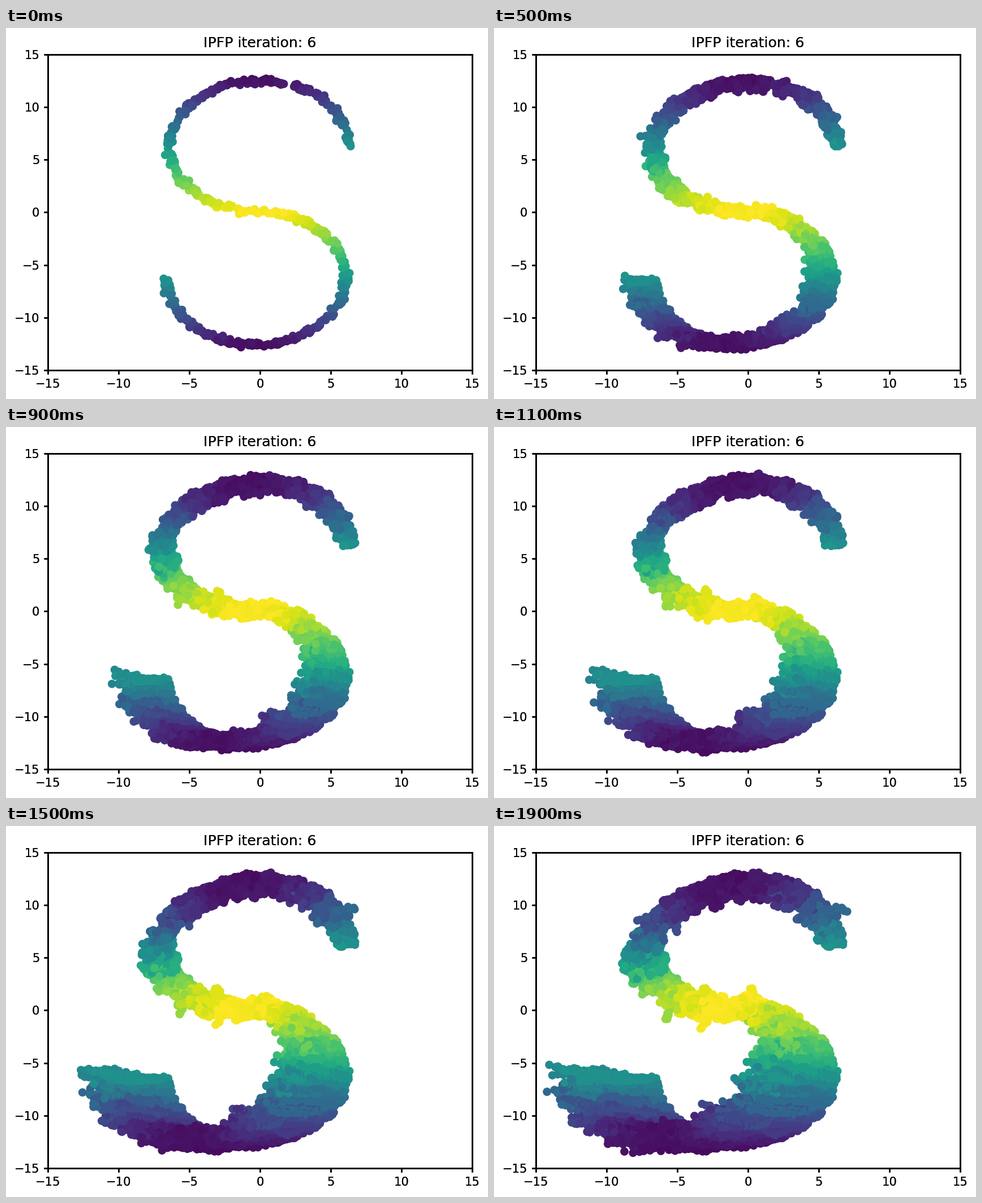
Animation of 852 by 657 pixels, one loop 2000 ms. Source, as a matplotlib script:

```python
import numpy as np
import matplotlib.pyplot as plt
from matplotlib.animation import FuncAnimation

W, H, DPI = 852, 657, 150
STEPS, STEP_MS = 20, 100
COUNT, SCALE, NOISE = 600, 6.3, 0.135
LEFT, RIGHT, TOP, BOTTOM = 74, 824, 47, 606

plt.rcParams.update({
    "axes.titlesize": 12.1, "xtick.labelsize": 10.1, "ytick.labelsize": 10.1,
    "axes.linewidth": 1.25, "xtick.major.width": 1.25, "ytick.major.width": 1.25,
})


def sigmoid(x):
    return 1 / (1 + np.exp(-x))


def s_curve(t):
    return SCALE * np.column_stack([np.sin(t), np.sign(t) * (np.cos(t) - 1)])


def total_drift(t):
    """The lower bowl slides left, the upper left arc sinks, the rest rises a little."""
    dx = -1.6 * sigmoid(2 * (t + 4.3)) - 5.2 * sigmoid(3 * (t - 1.1))
    dy = 0.5 - 2.7 * np.exp(-((t + 2.3) / 1.4) ** 2)
    return np.column_stack([dx, dy])


def make_walk():
    """Positions of every particle after each step, shape (STEPS, COUNT, 2)."""
    rng = np.random.default_rng(6)
    t = 3 * np.pi * (rng.random(COUNT) - 0.5)
    moves = total_drift(t) / STEPS + rng.normal(0, NOISE, (STEPS, COUNT, 2))
    return s_curve(t) + np.cumsum(moves, axis=0)


def add_panel(fig):
    ax = fig.add_axes([LEFT / W, 1 - BOTTOM / H, (RIGHT - LEFT) / W, (BOTTOM - TOP) / H])
    ax.set(xlim=(-15, 15), ylim=(-15, 15), title="IPFP iteration: 6")
    ax.set_xticks(range(-15, 16, 5))
    ax.set_yticks(range(-15, 16, 5))
    ax.patch.set_visible(False)
    return ax


walk = make_walk()
shade = -abs(walk[0, :, 1])

fig = plt.figure(figsize=(W / DPI, H / DPI), dpi=DPI, facecolor="white")
# Two stacked panels give the lettering its heavier edges
add_panel(fig)
ax = add_panel(fig)
dots = ax.scatter(*walk[0].T, c=shade, s=37, cmap="viridis", vmin=-13.1, vmax=0)


def update(frame):
    # Every earlier position stays visible beneath the newest ones
    dots.set_offsets(walk[:frame + 1].reshape(-1, 2))
    dots.set_array(np.tile(shade, frame + 1))
    return (dots,)


anim = FuncAnimation(fig, update, frames=STEPS, interval=STEP_MS,
                     repeat=True, repeat_delay=0)
plt.show()
```
